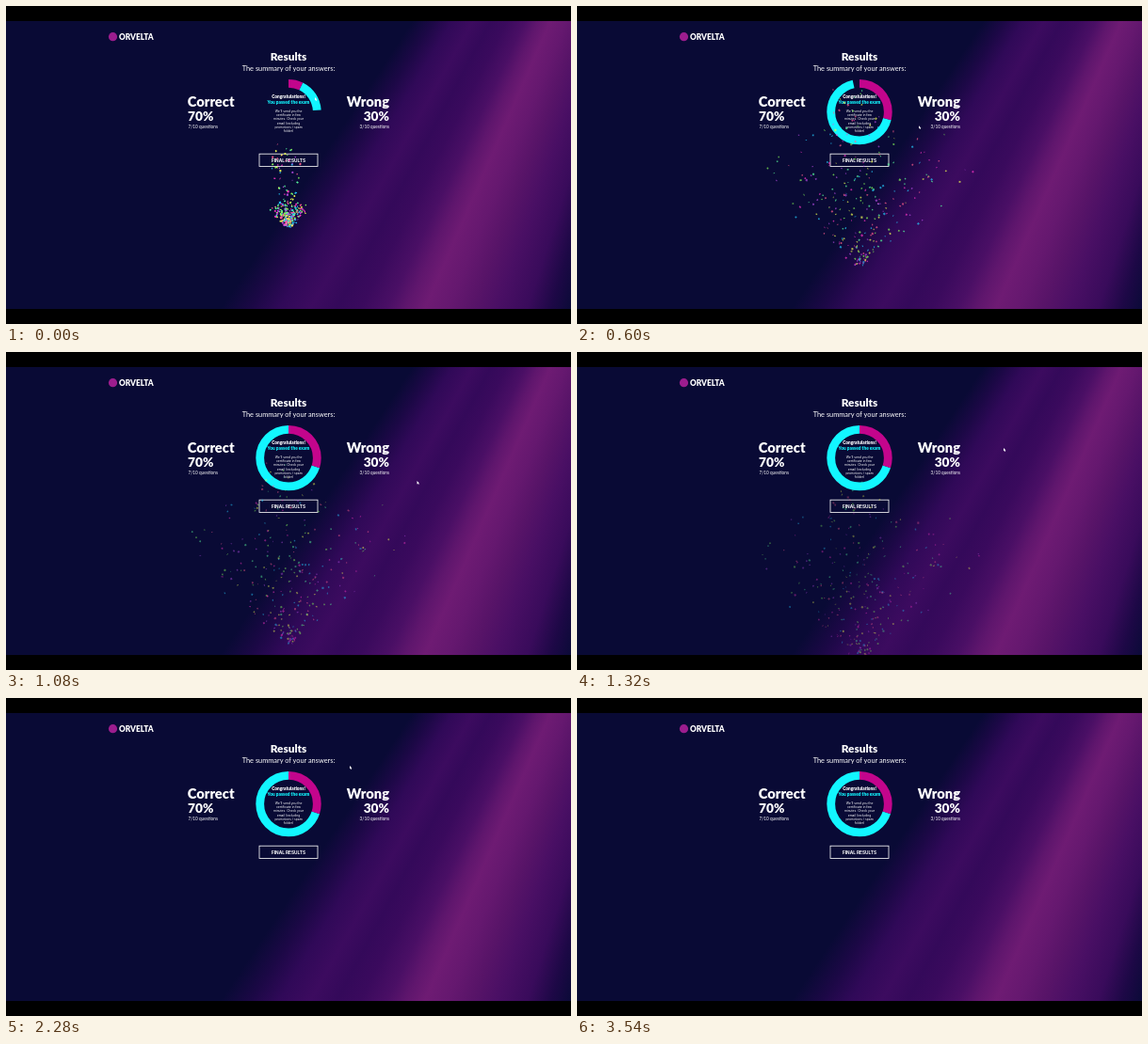
Animation of 600 by 338 pixels, one loop 3600 ms. Source, as an HTML page with a canvas:

```html
<!DOCTYPE html>
<html lang="en">
<head>
<meta charset="utf-8">
<title>Results</title>
<style>
html, body { margin: 0; width: 100%; height: 100%; overflow: hidden; background: #000; }
svg, canvas, .sky { position: absolute; left: 0; top: 0; width: 600px; height: 338px; }
.sky {
  top: 16px; height: 306px;
  background: conic-gradient(from 180deg at 856px -636px,
    #0b0a38 15.2deg, #1d0846 16.4deg, #390b5b 17.8deg, #490f64 19.5deg, #581468 21deg,
    #65186f 22.3deg, #6e1b73 23.6deg, #5f166d 24.6deg, #4a0f65 25.6deg, #3a0a5d 27deg,
    #34095a 28.2deg, #3c0b5f 29.5deg, #300958 31deg, #1c0846 32.3deg, #090a35 33.7deg);
}
text { font-family: Lato, sans-serif; font-weight: 900; fill: #fff; }
.mid { text-anchor: middle; }
.end { text-anchor: end; }
.big { font-size: 14.7px; }
.pct { font-size: 13.7px; }
.small { font-size: 4.7px; font-weight: 400; }
.note { font-family: Inter, sans-serif; font-size: 3.3px; font-weight: 400; }
.ring { fill: none; stroke-width: 8.8; }
</style>
</head>
<body>
<div class="sky"></div>
<svg viewBox="0 0 600 338">
  <circle cx="113.5" cy="32.7" r="4.6" fill="#9c1d8e"/>
  <text x="120" y="35.9" font-size="8.3">ORVELTA</text>

  <text class="mid" x="300" y="58.4" font-size="11.8">Results</text>
  <text class="mid" x="300" y="68.5" font-size="7.4" style="font-weight:400">The summary of your answers:</text>

  <text class="big" x="192.8" y="106.8">Correct</text>
  <text class="pct" x="193" y="122.4">70%</text>
  <text class="small" x="193.5" y="129.5">7/10 questions</text>
  <text class="big end" x="407" y="106.8">Wrong</text>
  <text class="pct end" x="407" y="122.4">30%</text>
  <text class="small end" x="407" y="129.5">3/10 questions</text>

  <g transform="rotate(-90 300 112.6)">
    <circle id="right" class="ring" cx="300" cy="112.6" r="30.3" pathLength="100" stroke="#12f6ff"/>
    <circle id="wrong" class="ring" cx="300" cy="112.6" r="30.3" pathLength="100" stroke="#c3058c"/>
  </g>

  <text class="mid" x="300" y="98" font-size="4.75">Congratulations!</text>
  <text class="mid" x="300" y="104" font-size="4.75" style="fill:#12f6ff">You passed the exam</text>
  <g class="mid">
    <text class="note" x="300" y="113.2">We'll send you the</text>
    <text class="note" x="300" y="117.3">certificate in few</text>
    <text class="note" x="300" y="121.4">minutes. Check your</text>
    <text class="note" x="300" y="125.5">email (including</text>
    <text class="note" x="300" y="129.6">promotions / spam</text>
    <text class="note" x="300" y="133.7">folder)</text>
  </g>

  <rect x="269" y="157.2" width="62" height="13.3" fill="none" stroke="#fff" stroke-width=".8"/>
  <text class="mid" x="300" y="165.5" font-size="4.75" style="font-family:Inter,sans-serif;font-weight:700">FINAL RESULTS</text>
</svg>
<canvas id="stage" width="600" height="338"></canvas>

<script>
const LOOP = 3600, STEP = 60, FADE = 2.1;
const COLORS = ['#26ccff', '#b24be0', '#ff36c8', '#88ff5a', '#f0ff50', '#ff5e8e', '#5affa0'];
const POINTER = [[0, 328, 97], [420, 326, 98], [840, 420, 172], [1320, 453, 102], [1800, 402, 100],
  [2280, 365, 72], [2760, 386, 88], [3540, 402, 100]];
const ctx = document.getElementById('stage').getContext('2d');
const right = document.getElementById('right');
const wrong = document.getElementById('wrong');

let seed = 4217;
function rand() {
  seed = (seed * 16807) % 2147483647;
  return seed / 2147483647;
}

function burst(count, spread, near, far, drag, lead) {
  return Array.from({ length: count }, (_, i) => ({
    angle: (rand() - 0.5) * spread,
    reach: near + rand() ** 1.25 * (far - near),
    drag, lead,
    size: 1.4 + rand() * 0.8,
    wobble: rand() * 10,
    rate: 6 + rand() * 3,
    spin: rand() * 6.28,
    round: rand() < 0.4,
    color: COLORS[i % COLORS.length]
  }));
}

const confetti = [
  ...burst(48, 0.5, 65, 200, 6.3, 0.095),
  ...burst(190, 1.6, 3, 165, 3.7, 0.047),
  ...burst(55, 1.9, 5, 185, 3.6, 0.045)
];

function drawPiece(p, sec) {
  const age = sec + p.lead;
  const alpha = 1 - age / FADE;
  if (alpha <= 0) return;
  const dist = p.reach * (1 - Math.exp(-p.drag * age));
  const phase = p.wobble + p.rate * age;
  const x = 300 + Math.sin(p.angle) * dist + Math.cos(phase) * 4;
  const y = 230 - Math.cos(p.angle) * dist + 72 * age + Math.sin(phase) * 2;
  const w = p.size * (0.35 + 0.65 * Math.abs(Math.cos(phase)));
  ctx.save();
  ctx.globalAlpha = alpha;
  ctx.fillStyle = p.color;
  ctx.translate(x, y);
  ctx.rotate(p.spin + phase * 0.6);
  if (p.round) {
    ctx.beginPath();
    ctx.ellipse(0, 0, w / 2, p.size / 2, 0, 0, 7);
    ctx.fill();
  } else {
    ctx.fillRect(-w / 2, -p.size / 2, w, p.size);
  }
  ctx.restore();
}

function drawPointer(ms) {
  let i = 0;
  while (i < POINTER.length - 2 && ms >= POINTER[i + 1][0]) i++;
  const [t0, x0, y0] = POINTER[i], [t1, x1, y1] = POINTER[i + 1];
  const k = (ms - t0) / (t1 - t0);
  const e = k * k * (3 - 2 * k);
  ctx.save();
  ctx.translate(x0 + (x1 - x0) * e, y0 + (y1 - y0) * e);
  ctx.fillStyle = '#fff';
  ctx.fill(new Path2D('M0 0V3.4L.9 2.7L1.5 3.9L2.1 3.6L1.5 2.5H2.5Z'));
  ctx.restore();
}

function render(ms) {
  const x = Math.min(1, (ms + 79) / 1190);
  const p = 100 * (1 - (1 - x) ** 4);
  wrong.setAttribute('stroke-dasharray', `${p * 0.3} 200`);
  right.setAttribute('stroke-dasharray', `0 ${p * 0.3} ${p * 0.7} 200`);

  ctx.clearRect(0, 0, 600, 338);
  ctx.save();
  ctx.beginPath();
  ctx.rect(0, 16, 600, 306);
  ctx.clip();
  confetti.forEach(c => drawPiece(c, ms / 1000));
  drawPointer(ms);
  ctx.restore();
}

const start = performance.now();
function tick() {
  const ms = (performance.now() - start) % LOOP;
  render(Math.floor(ms / STEP) * STEP);
  requestAnimationFrame(tick);
}
tick();
</script>
</body>
</html>
```
